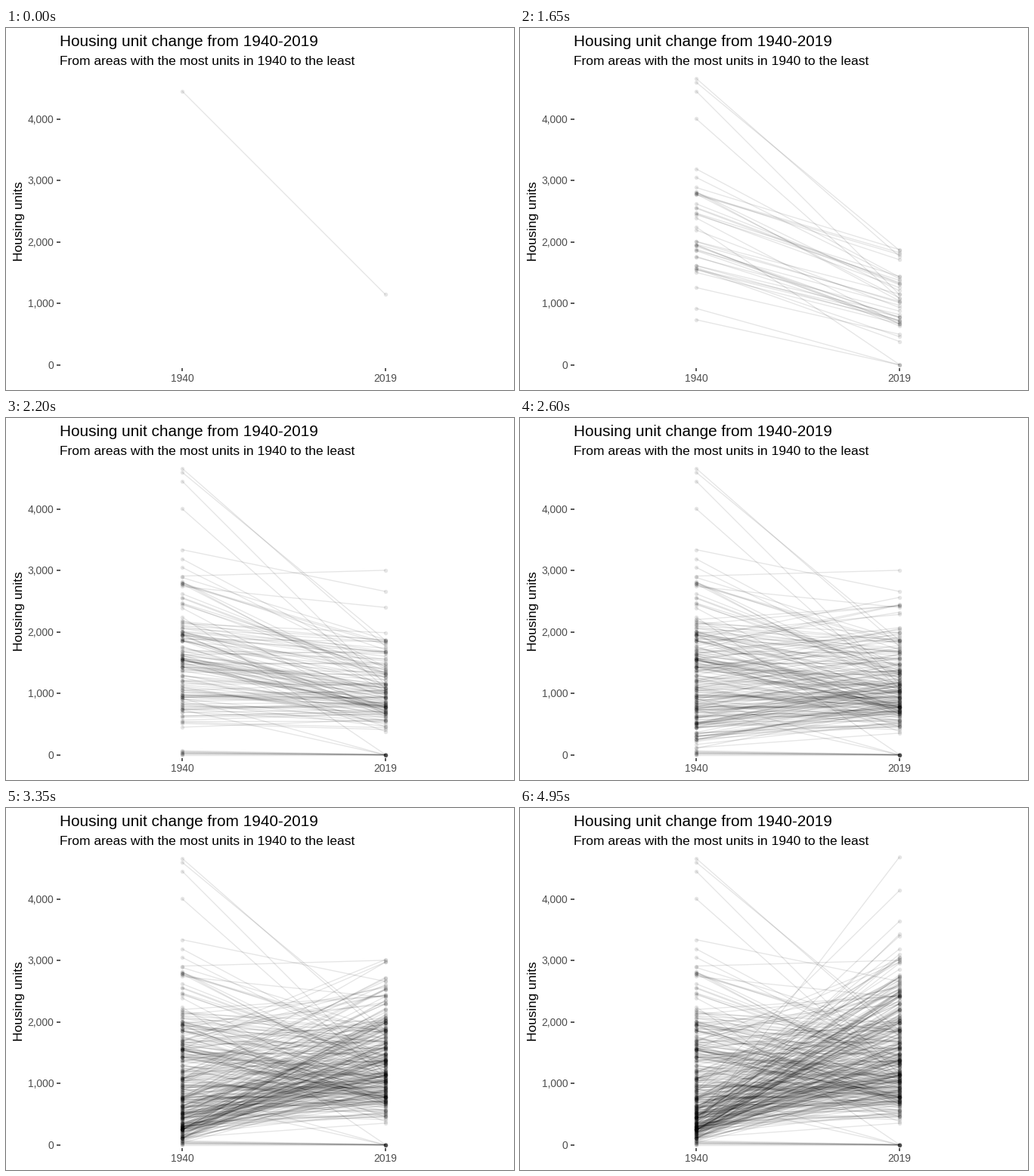
Animation, 672 px wide and 480 px high, one loop 5000 ms. Source, as a matplotlib script:

```python
import matplotlib.pyplot as plt
import numpy as np
from matplotlib.animation import FuncAnimation
from matplotlib.collections import LineCollection

W, H, DPI = 672, 480, 96
PT = 72 / DPI
FRAMES, INTERVAL = 100, 50
X_1940, X_2019 = 233, 502
Y_ZERO, Y_SCALE = 446.8, 0.0815
INK = (0, 0, 0, 0.1)
GREY = "#4D4D4D"

plt.rcParams["font.family"] = "Liberation Sans"
rng = np.random.default_rng(1940)

# Areas that stand clear of the crowd: (units in 1940, units in 2019)
OUTLIERS = [
    (4455, 1145), (4006, 1080), (4663, 1767), (4600, 1865), (2245, 5),
    (3190, 1430), (920, 0), (736, 0), (3340, 2660), (2910, 3005),
    (2740, 2400), (380, 3400), (540, 3640), (176, 3430), (886, 4140),
    (350, 4685),
]


def batch(n, lo, hi, median, spread, floor, top):
    """Areas whose change runs evenly from lo to hi over log-normal bases."""
    change = np.linspace(lo, hi, n)
    base = median * np.exp(spread * rng.standard_normal(n))
    limit = top - np.abs(change)
    outside = (base < floor) | (base > limit)
    base = np.where(outside, rng.uniform(floor, limit), base)
    return np.column_stack([base + np.maximum(-change, 0),
                            base + np.maximum(change, 0)])


areas = np.vstack([
    OUTLIERS,
    batch(5, -1770, -1610, 1000, 0.4, 480, 3060),    # steep falls
    batch(30, -1320, -760, 950, 0.5, 320, 2960),
    batch(70, -715, -40, 1000, 0.5, 310, 2300),      # gentle falls
    batch(28, -38, 126, 1000, 0.5, 380, 2000),       # nearly level
    batch(8, -60, 0, 2, 1.0, 0, 80),                 # almost empty
    batch(85, 128, 740, 750, 0.7, 10, 2600),         # gentle rises
    batch(50, 745, 1200, 400, 1.0, 10, 2620),
    batch(60, 1215, 1900, 320, 1.0, 60, 3045),       # steep rises
    batch(36, 1905, 2330, 300, 0.7, 110, 3040),
    batch(5, 2480, 2710, 450, 0.4, 110, 3340),
])
change = areas[:, 1] - areas[:, 0]
order = np.argsort(change)
areas, change = areas[order], change[order]

# Each area appears when the clock, linear in change, reaches it.
start = np.round((change - change[0]) / np.ptp(change) * (FRAMES - 1))
ends_y = Y_ZERO - areas * Y_SCALE
ends_x = np.broadcast_to([X_1940, X_2019], ends_y.shape)
segments = np.stack([ends_x, ends_y], axis=2)

fig = plt.figure(figsize=(W / DPI, H / DPI), dpi=DPI, facecolor="white")
ax = fig.add_axes([0, 0, 1, 1])
ax.set_xlim(0, W)
ax.set_ylim(H, 0)
ax.axis("off")


def label(x, y, text, size, color="black", **kw):
    ax.text(x, y, text, fontsize=size * PT, color=color, va="baseline", **kw)


def tick(xs, ys):
    ax.plot(xs, ys, color="#333333", lw=1.6 * PT, solid_capstyle="butt")


label(71, 24, "Housing unit change from 1940-2019", 20.8)
label(71, 49, "From areas with the most units in 1940 to the least", 17.33)
label(21.7, 256.5, "Housing units", 17.33, ha="center", rotation=90,
      rotation_mode="anchor")

for value in range(0, 5000, 1000):
    y = Y_ZERO - value * Y_SCALE
    tick([67.2, 71.5], [y, y])
    label(63.3, y + 5, f"{value:,}", 13.9, GREY, ha="right")
for x, year in ((X_1940, "1940"), (X_2019, "2019")):
    tick([x, x], [450.8, 455.1])
    label(x, 469, year, 13.9, GREY, ha="center")

lines = LineCollection([], colors=[INK], linewidths=1.35 * PT)
ax.add_collection(lines)
dots = ax.scatter([], [], s=(5.4 * PT) ** 2, color=[INK], linewidths=0,
                  zorder=3)


def update(frame):
    shown = segments[:np.searchsorted(start, frame, side="right")]
    lines.set_segments(shown)
    dots.set_offsets(shown.reshape(-1, 2))
    return lines, dots


anim = FuncAnimation(fig, update, frames=FRAMES, interval=INTERVAL,
                     repeat=True, repeat_delay=0)
plt.show()
```
